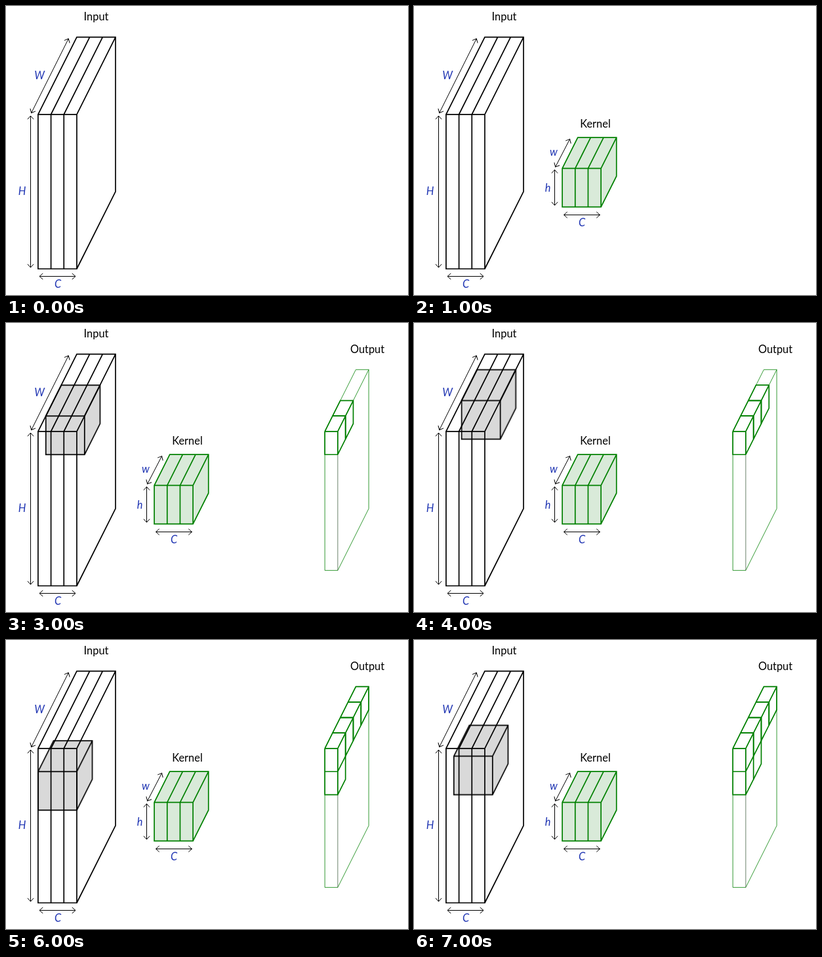
An HTML page for the animation above (8000 ms loop, 613 by 442 pixels).

```html
<!DOCTYPE html>
<html lang="en">
<head>
<meta charset="utf-8">
<title>Convolution</title>
<style>
html, body { margin: 0; width: 100%; height: 100%; overflow: hidden; background: #fff; }
svg { display: block; width: 613px; height: 442px; }
path, use { fill: none; vector-effect: non-scaling-stroke; }
.ink { stroke: #000; stroke-width: 1.7; }
.green { stroke: #008000; stroke-width: 1.7; }
.thin { stroke: #008000; stroke-width: .8; }
.edge { stroke: #456045; stroke-width: .8; }
.arrow path { stroke: #000; stroke-width: 1; marker-start: url(#head); marker-end: url(#head); }
#head path { stroke: #000; stroke-width: 1; marker: none; }
text { font: 16.4px Lato, "Open Sans", sans-serif; text-anchor: middle; }
.var text { font-style: italic; fill: #2136b3; }
.shade { fill: #000; fill-opacity: .15; }
.tint { fill: #d9ead9; }

/* each step lasts one second of the eight second loop */
[class*="at"] { visibility: hidden; animation: 8s step-end infinite; }
.at1 { animation-name: at1; }
.at2 { animation-name: at2; }
.at3 { animation-name: at3; }
.at4 { animation-name: at4; }
.at5 { animation-name: at5; }
.at6 { animation-name: at6; }
.at7 { animation-name: at7; }
@keyframes at1 { 0% { visibility: hidden } 12.5%, 100% { visibility: visible } }
@keyframes at2 { 0% { visibility: hidden } 25%, 100% { visibility: visible } }
@keyframes at3 { 0% { visibility: hidden } 37.5%, 100% { visibility: visible } }
@keyframes at4 { 0% { visibility: hidden } 50%, 100% { visibility: visible } }
@keyframes at5 { 0% { visibility: hidden } 62.5%, 100% { visibility: visible } }
@keyframes at6 { 0% { visibility: hidden } 75%, 100% { visibility: visible } }
@keyframes at7 { 0% { visibility: hidden } 87.5%, 100% { visibility: visible } }

.slide { animation: slide 8s step-end infinite; }
@keyframes slide {
  0%    { transform: translate(0, 0) }
  37.5% { transform: translate(1px, -2px) }
  50%   { transform: translate(2px, -4px) }
  62.5% { transform: translate(3px, -6px) }
  75%   { transform: translate(0, 3px) }
  87.5%, 100% { transform: translate(1px, 1px) }
}
</style>
</head>
<body>
<svg viewBox="0 0 613 442">
  <defs>
    <marker id="head" orient="auto-start-reverse" markerUnits="userSpaceOnUse" overflow="visible">
      <path d="M-5.2-4.6L0 0L-5.2 4.6"/>
    </marker>
    <path id="block" d="M0 0l2-4h5v5l-2 4h-5zh5v5M5 0l2-4"/>
    <path id="hull" d="M0 0l2-4h5v5l-2 4h-5z"/>
    <path id="cell" d="M0 0l1-2h1.667v3l-1 2V0H0M1.667 0l1-2"/>
  </defs>

  <!-- input volume -->
  <g transform="translate(48.9 165.8) scale(11.81)">
    <g class="at2"><g class="slide">
      <path class="shade" d="M0 0l2-4h5v5l-2 4h-5z"/>
      <use class="ink" href="#block"/>
    </g></g>
    <path class="ink" d="M0 0h5v20h-5zl5-10h5v20l-5 10M5 0l5-10M1.667 20V0l5-10M3.333 20V0l5-10"/>
  </g>
  <text x="137.5" y="22">Input</text>
  <g class="arrow">
    <path d="M38.7 163.5L95.3 50"/>
    <path d="M37.5 168V400"/>
    <path d="M51 413.5H106"/>
  </g>
  <g class="var">
    <text x="51" y="112">W</text>
    <text x="24.5" y="289">H</text>
    <text x="79" y="431">C</text>
  </g>

  <!-- kernel -->
  <g class="at1">
    <g transform="translate(226.1 248.4) scale(11.81)">
      <path class="tint" d="M0 0l2-4h5v5l-2 4h-5z"/>
      <use class="green" href="#block"/>
      <path class="green" d="M1.667 5V0l2-4M3.333 5V0l2-4"/>
    </g>
    <text x="276.5" y="186">Kernel</text>
    <g class="arrow">
      <path d="M215.6 246.2L237.6 203.6"/>
      <path d="M214.5 250.5V305"/>
      <path d="M228.5 319.5H283.5"/>
    </g>
    <g class="var">
      <text x="213" y="228.5">w</text>
      <text x="204" y="283.5">h</text>
      <text x="256" y="337">C</text>
    </g>
  </g>

  <!-- output volume -->
  <g class="at2">
    <text x="551" y="45.5">Output</text>
    <g transform="translate(486.2 165.8) scale(11.81)">
      <path class="thin" d="M1.667 18H0V0h1.667M0 0l4-8h1.667v18l-4 8M1.667 0l4-8"/>
      <path class="edge" d="M1.667 0v18"/>
      <path class="green" d="M0 0v3h1.667"/>
      <use class="green" href="#cell"/>
      <g class="at3"><use class="green" href="#cell" transform="translate(1 -2)"/></g>
      <g class="at4"><use class="green" href="#cell" transform="translate(2 -4)"/></g>
      <g class="at5"><use class="green" href="#cell" transform="translate(3 -6)"/></g>
      <path class="green at6" d="M0 3v3h1.667v-3M1.667 6l1-2v-3"/>
      <path class="green at7" d="M2.667 4l1-2v-3"/>
    </g>
  </g>
</svg>
</body>
</html>
```
